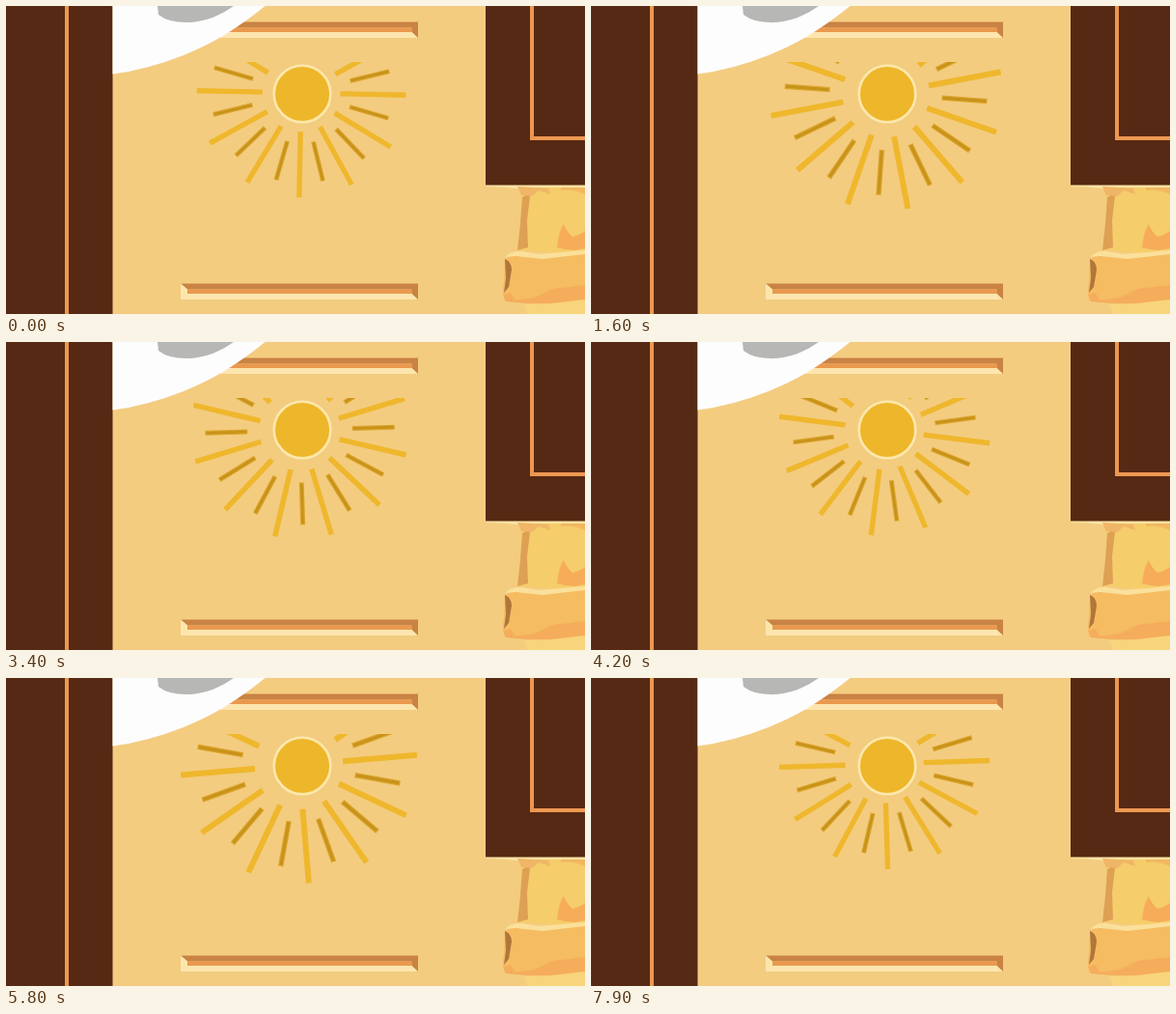
These frames come from a looping animation (600 by 319 pixels, 8000 ms). An HTML page:

```html
<!DOCTYPE html>
<html lang="en">
<head>
<meta charset="utf-8">
<title>Spinning sun</title>
<style>
  html, body { margin: 0; width: 100%; height: 100%; overflow: hidden; background: #f3cc80; }
  svg { display: block; width: 100vw; height: 100vh; }
</style>
</head>
<body>
<svg viewBox="0 0 600 319" preserveAspectRatio="none">
  <defs>
    <clipPath id="window"><path d="M111 58H497V319H111z"/></clipPath>
    <g id="slot">
      <path fill="#c98344" d="M181 0H427V17L420 10V6H188z"/>
      <path fill="#ea994f" d="M187 6H421V11H187z"/>
      <path fill="#fde6ae" d="M181 0L188 6V10.5H420.5L427 16.5H181z"/>
    </g>
    <g id="pair">
      <path stroke="#efb72c" stroke-width="5.3" d="M40.3 0H108.3"/>
      <g transform="rotate(15)">
        <path stroke="#dba62a" stroke-width="4.8" d="M52 0H94"/>
        <path stroke="#c8921b" stroke-width="2.6" d="M53 0H93"/>
      </g>
    </g>
  </defs>

  <path fill="#f3cc80" d="M0 0H600V319H0z"/>
  <use href="#slot" y="16.5"/>
  <use href="#slot" y="287.5"/>

  <!-- brickwork -->
  <path fill="#fbe3a4" d="M497 185H600V190H535Q520 187 497 187z"/>
  <path fill="#f5cd6b" d="M532 188H600V258L531 253Q536 220 532 188z"/>
  <path fill="#f0b566" d="M530 187L562 189 564 195 552 191 545 197 534 196z"/>
  <path fill="#f3b75f" d="M575 188L600 188V195Q588 189 575 191z"/>
  <path fill="#dea154" d="M535 198Q539 195 543 197L540 222 541 250 530 253 533 225z"/>
  <path fill="#f6ac58" d="M571 250Q573 232 578 226 581 234 587 239 593 238 600 233V251Q585 255 571 250z"/>
  <path fill="#f5bc62" d="M517 262Q530 254 545 258L600 256V308L575 310 548 307 518 306Q513 300 516 286z"/>
  <path fill="#fbe09b" d="M517 260Q524 253 534 254L552 257 600 253V257L556 262 528 259z"/>
  <path fill="#f5ad5b" d="M515 299L523 297 527 305 548 302 566 293 600 289V306L570 309 540 308 518 306z"/>
  <path fill="#f8d47c" d="M537 309L565 308 600 304V319H540z"/>
  <path fill="#b0763a" d="M517 262Q524 265 524 273L521 291 516 297 518 282z"/>

  <!-- dark panels -->
  <path fill="#552913" d="M0 0H110.5V319H0zM497 0H600V185.5H497z"/>
  <path fill="none" stroke="#ec9850" stroke-width="4" d="M63 0V319M545 0V137H600"/>

  <path fill="#fefdfe" d="M110.5 0H268.500C242 21 218 37 184 51Q146 66 110.500 70.500z"/>
  <path fill="#b7b7b5" d="M157 0H236C223 9 207 17 187 17Q168 17 158 9z"/>

  <g clip-path="url(#window)"><g id="rays"></g></g>
  <circle cx="307" cy="91" r="29.300" fill="#eeb62b" stroke="#fde8ac" stroke-width="2.600"/>
</svg>
<script>
const rays = document.getElementById('rays');
for (let a = 0; a < 360; a += 30) {
  rays.innerHTML += `<use href="#pair" transform="rotate(${a})"/>`;
}

// One turn takes 12 s around a slightly off-centre pivot; the pulse takes 4 s.
function draw(now) {
  const t = Math.floor(now % 8000 / 100) / 10;
  const scale = 1 + 0.148 * (1 - Math.abs(t % 4 - 2) / 2);
  rays.setAttribute('transform',
    `translate(304.8 90) rotate(${30 * t}) translate(1.25 0) rotate(1.2) scale(${scale})`);
  requestAnimationFrame(draw);
}
draw(performance.now());
</script>
</body>
</html>
```
